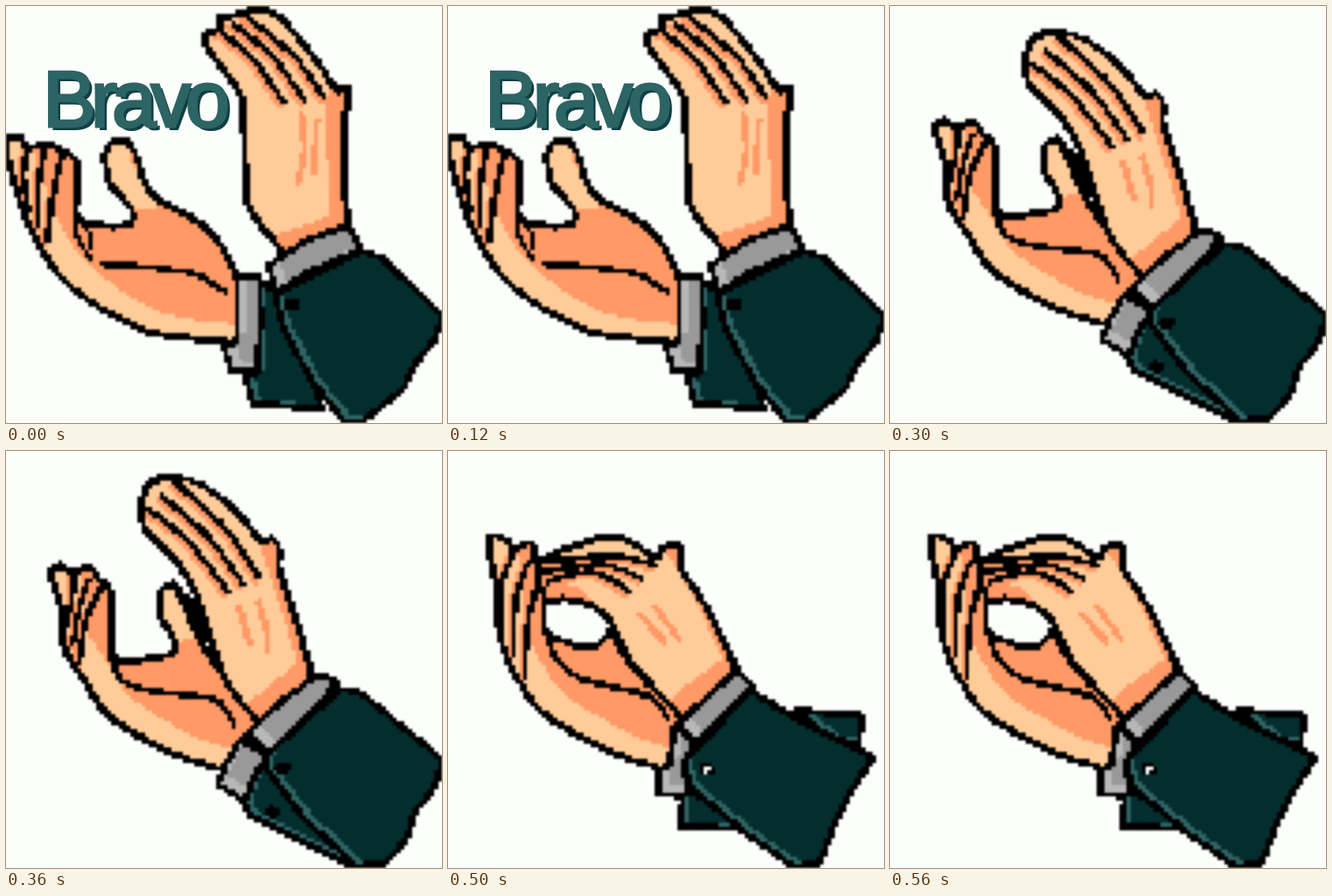
An HTML page with a canvas for the animation above (0.6 s loop, 498 px wide and 477 px high).

```html
<!DOCTYPE html>
<html lang="en">
<head>
<meta charset="utf-8">
<title>Clapping hands</title>
<style>
  html, body { margin: 0; width: 100%; height: 100%; overflow: hidden; background: #fcfefc; }
  canvas { position: absolute; left: 0; top: 0; width: 498px; height: 477px; image-rendering: pixelated; filter: blur(.8px); }
  #word {
    position: absolute; left: 42px; top: 57px; font: 91px/100px "Liberation Sans", Arial, sans-serif;
    letter-spacing: -6px; color: #2d6464; -webkit-text-stroke: 3px #2d6464;
    text-shadow: 4px 4px #0f4044; filter: blur(.6px); white-space: nowrap;
  }
</style>
</head>
<body>
<canvas id="stage" width="116" height="111"></canvas>
<div id="word">Bravo</div>
<script>
const W = 498, H = 477, COLS = 116, ROWS = 111;
const LIGHT = '#ffcc99', DARK = '#ff9966', GREEN = '#042e2e', TEAL = '#2f6464',
      GREY = '#b8b8b8', SHADE = '#999999', INK = '#000000', PAPER = '#fcfefc';

function grid() {
  const canvas = document.createElement('canvas');
  canvas.width = COLS;
  canvas.height = ROWS;
  return canvas;
}

const pen = grid().getContext('2d', { willReadFrequently: true });
pen.scale(COLS / W, ROWS / H);
pen.lineJoin = pen.lineCap = 'round';
let target;

// Paints one layer in hard-edged cells, optionally inside a clip path.
function stamp(paint, clip) {
  pen.clearRect(0, 0, W, H);
  pen.save();
  if (clip) pen.clip(clip);
  paint();
  pen.restore();
  const image = pen.getImageData(0, 0, COLS, ROWS);
  for (let i = 3; i < image.data.length; i += 4) image.data[i] = image.data[i] > 115 ? 255 : 0;
  pen.putImageData(image, 0, 0);
  target.drawImage(pen.canvas, 0, 0);
}

const parse = text => text.split(' ').map(pair => pair.split(',').map(Number));
const poly = text => new Path2D('M' + text);

// Smooth curve through key points.
function curve(points) {
  const path = new Path2D();
  path.moveTo(...points[0]);
  for (let i = 1; i < points.length; i++) {
    const b = points[i - 1], c = points[i], a = points[i - 2] || b, d = points[i + 1] || c;
    path.bezierCurveTo(b[0] + (c[0] - a[0]) / 8, b[1] + (c[1] - a[1]) / 8,
                       c[0] - (d[0] - b[0]) / 8, c[1] - (d[1] - b[1]) / 8, ...c);
  }
  return path;
}

function stroke(path, width, color, clip) {
  stamp(() => {
    pen.lineWidth = width;
    pen.strokeStyle = color;
    pen.stroke(path);
  }, clip);
}

const line = (text, width = 6.5, color = INK) => stroke(curve(parse(text)), width, color);
const streak = text => line(text, 7, DARK);
const button = (x, y) => line(`${x - 3},${y} ${x + 3},${y}`, 13);

// Two-tone area: the second tone is the same shape, shifted and clipped.
function tone(path, under, over, dx, dy) {
  stamp(() => { pen.fillStyle = under; pen.fill(path); });
  stamp(() => { pen.translate(dx, dy); pen.fillStyle = over; pen.fill(path); }, path);
}

function cloth(text, ...tones) {
  const path = poly(text + 'Z');
  tone(path, ...tones);
  stroke(path, 7, INK);
}
const sleeve = text => cloth(text, TEAL, GREEN, 9, -5);
const cuff = text => cloth(text, GREY, SHADE, 12, -10);

const PALM = [LIGHT, DARK, 28, -18], BACK = [DARK, LIGHT, -20, -22];

// The finger creases are blended evenly from the first to the last.
function hand(outline, tones, first, last, count) {
  const path = curve(parse(outline)), from = parse(first), to = parse(last);
  tone(path, ...tones);
  for (let i = 0; i < count; i++) {
    const blend = shift => curve(from.map((p, j) => p.map((v, axis) =>
      v + (to[j][axis] - v) * i / (count - 1) + (axis ? shift : -shift))));
    stroke(blend(4), 8, DARK, path);
    stroke(blend(0), 6.5, INK, path);
  }
  stroke(path, 7.5, INK);
}

function pose(paint) {
  target = grid().getContext('2d');
  paint();
  return target.canvas;
}

const apart = pose(() => {
  sleeve('288,312 312,330 362,462 282,454 273,424 288,420');
  hand('266,318 250,280 224,250 176,223 160,205 146,165 130,153 114,165 117,200 143,232 140,250 100,250 ' +
       '80,238 82,180 62,164 42,160 24,162 17,151 2,152 4,182 28,255 58,304 100,341 165,373 266,386',
       PALM, '24,162 20,195 26,235', '64,170 53,220 47,268', 3);
  line('112,295 165,299 215,306 250,327');
  line('78,240 82,265 99,293', 5);
  line('78,240 95,258 98,278', 5);
  cuff('264,309 289,309 291,360 287,418 258,418 248,388 264,384');
  hand('320,286 277,230 273,180 271,112 259,87 230,48 229,32 243,27 245,13 262,10 288,4 312,13 ' +
       '353,60 371,87 379,97 392,95 391,112 386,130 387,200 391,262',
       BACK, '243,28 282,60 317,110', '275,13 330,58 364,106', 3);
  streak('338,125 341,165 334,202');
  streak('355,130 352,192');
  sleeve('404,280 428,287 500,356 488,384 464,414 456,436 408,475 386,475 350,430 318,370 307,331');
  cuff('299,297 340,270 388,251 396,258 405,279 350,302 309,328');
  button(327, 342);
});

const closing = pose(() => {
  sleeve('292,352 272,403 278,416 330,443 400,478 370,445');
  hand('290,312 236,240 214,203 202,170 191,152 178,160 176,187 190,213 193,231 140,240 120,232 121,163 ' +
       '107,147 95,133 75,139 62,131 53,136 53,147 64,182 66,225 84,254 118,303 190,346 252,366',
       PALM, '78,142 76,165 70,200', '112,152 92,190 84,242', 3);
  line('118,232 130,260 165,274 235,283 252,296 261,314');
  line('208,170 217,190 226,216', 10);
  hand('292,314 255,270 236,220 212,152 192,124 158,88 154,64 161,41 175,32 195,29 224,40 250,58 ' +
       '276,84 292,105 303,99 313,114 312,135 335,205 352,264',
       BACK, '162,66 208,103 254,161', '194,36 252,90 290,145', 3);
  streak('267,180 279,222');
  streak('288,172 298,208 298,228');
  sleeve('382,272 404,276 500,354 490,384 464,418 460,440 434,472 400,475 342,422 296,362 300,345');
  cuff('268,330 298,350 284,372 272,400 242,382 250,360');
  cuff('275,323 318,283 357,256 380,264 348,298 302,346');
  button(316, 362);
  button(304, 413);
});

const together = pose(() => {
  hand('198,322 150,298 114,246 100,200 82,135 82,100 100,99 108,114 122,107 132,121 175,121 200,131 ' +
       '204,119 223,118 223,145 246,170 269,171 270,203 296,237 314,292',
       PALM, '108,116 98,140 92,165', '157,150 138,180 121,212', 4);
  hand('248,368 202,326 180,271 166,231 152,187 157,151 142,133 156,122 177,125 207,135 235,164 ' +
       '257,192 273,224 285,264 296,302',
       BACK, '155,163 172,178 187,197', '178,127 216,148 236,173', 4);
  line('154,190 148,228 167,253');
  streak('224,209 244,258');
  streak('212,237 230,275');
  sleeve('317,300 332,291 478,301 480,346 485,360 420,360');
  sleeve('318,303 378,323 438,345 488,355 478,385 473,430 450,473 410,466 272,408 281,377 300,331');
  cuff('290,291 326,295 300,332 281,377 273,402 233,377 254,354 275,316');
  button(304, 412);
});

const opening = pose(() => {
  sleeve('396,297 474,302 469,335 440,330');
  sleeve('270,390 264,428 334,433 305,400');
  hand('270,306 205,240 150,130 120,125 99,127 97,105 84,108 75,116 66,101 49,97 49,125 57,160 ' +
       '57,200 74,251 110,301 190,346 252,366',
       PALM, '75,117 62,150 63,205', '106,140 92,192 87,260', 3);
  line('111,203 124,239 155,262 208,274 236,284 252,306');
  tone(curve(parse('110,180 132,169 165,177 186,204 172,222 145,222 111,205 110,180')), PAPER, PAPER, 0, 0);
  line('110,180 111,205 145,222 172,222 186,204', 7);
  hand('334,258 290,170 267,136 267,111 248,109 237,122 210,104 183,98 150,107 104,128 112,172 ' +
       '132,169 165,177 186,195 205,236 232,268 270,308',
       BACK, '104,128 185,119 237,130', '112,150 165,138 208,161', 3);
  streak('219,187 247,218');
  streak('236,177 264,215');
  sleeve('345,274 400,307 486,350 466,380 444,420 424,473 394,475 344,440 278,386 269,358');
  cuff('259,314 281,335 268,359 276,388 268,395 240,392 242,366 253,357');
  cuff('262,312 300,278 329,252 350,269 318,299 282,335');
  button(295, 364);
  line('294,365 297,362', 6, PAPER);
});

const poses = [apart, apart, closing, closing, together, opening];
const screen = stage.getContext('2d');
const start = performance.now();

function tick() {
  const step = Math.floor((performance.now() - start) / 100) % poses.length;
  screen.fillStyle = PAPER;
  screen.fillRect(0, 0, COLS, ROWS);
  screen.drawImage(poses[step], 0, 0);
  word.hidden = step > 1;
  requestAnimationFrame(tick);
}
tick();
</script>
</body>
</html>
```
